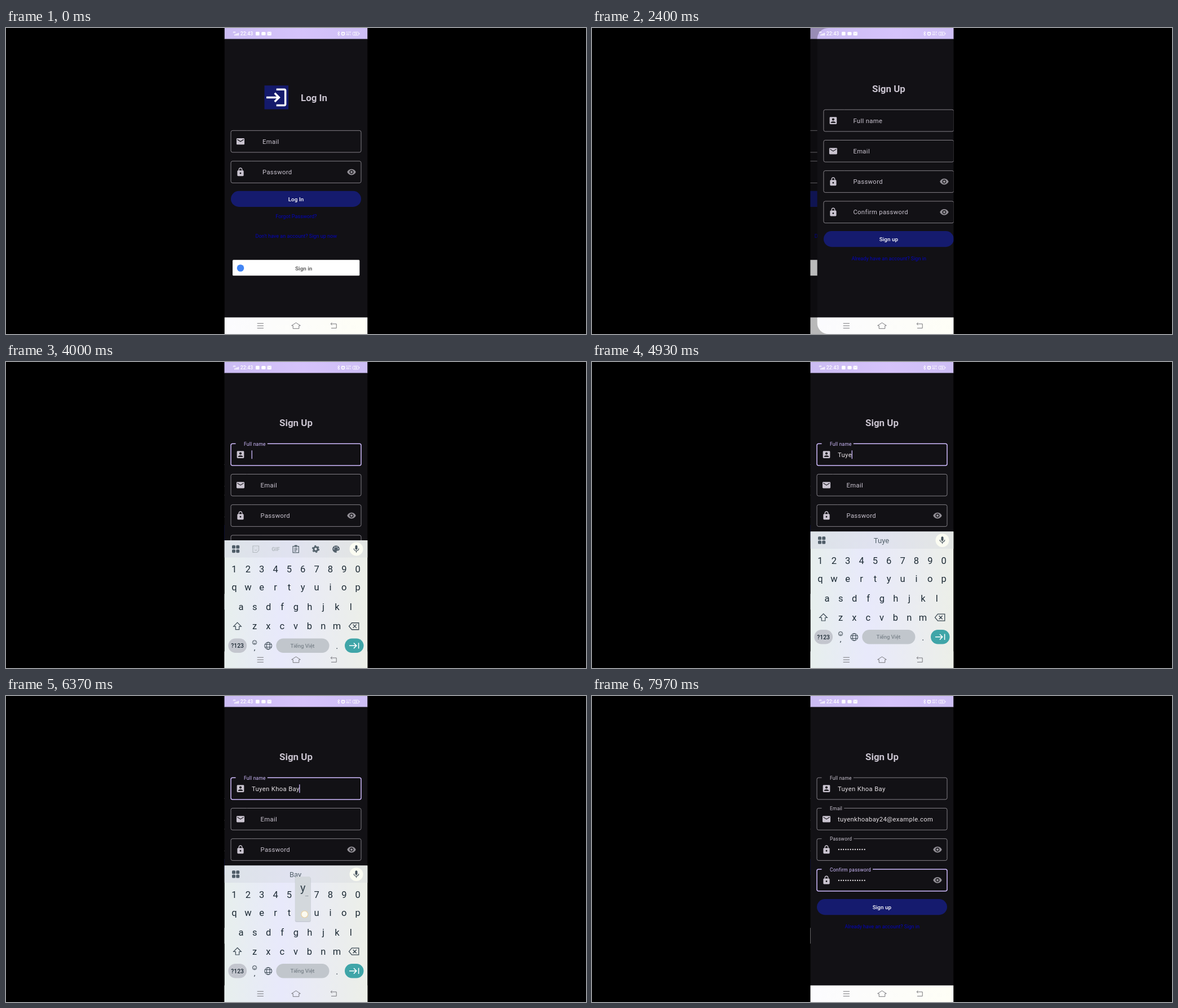
Animation of 1029x544 px, one loop 8000 ms. Source, as an HTML page:

```html
<!DOCTYPE html>
<html lang="en">
<head>
<meta charset="utf-8">
<title>Sign up flow</title>
<style>
html, body { margin: 0; width: 100%; height: 100%; overflow: hidden; background: #000; }
svg { display: block; }
text { font-family: Roboto, sans-serif; white-space: pre; }
</style>
</head>
<body>
<svg id="stage" width="1029" height="544" viewBox="0 0 1029 544">
  <defs>
    <clipPath id="phone"><rect x="387.5" width="254" height="544"/></clipPath>
    <clipPath id="sheet"><rect id="sheetBox" x="387.5" width="300" height="544"/></clipPath>
    <linearGradient id="bar"><stop stop-color="#cbbcf3"/><stop offset=".55" stop-color="#d6c3fb"/><stop offset="1" stop-color="#cdbef5"/></linearGradient>
    <linearGradient id="nav"><stop stop-color="#fbfbfe"/><stop offset="1" stop-color="#fefef6"/></linearGradient>
    <linearGradient id="board"><stop stop-color="#e7efed"/><stop offset=".4" stop-color="#e8e9fb"/><stop offset="1" stop-color="#ecefe8"/></linearGradient>
    <linearGradient id="strip"><stop stop-color="#dde3e8"/><stop offset=".45" stop-color="#e0e2f0"/><stop offset="1" stop-color="#e3e6e3"/></linearGradient>
  </defs>
  <rect width="1029" height="544" fill="#000"/>
  <g id="root" clip-path="url(#phone)"></g>
</svg>
<script>
const LOOP = 8000;
const SLIDE = 2190, FOCUS = 3740, KEYS_UP = 3800, NEXT = 6660, CUT = 7760;
const NAME = 'Tuyen Khoa Bay';
const NAME_AT = [4330, 4500, 4680, 4850, 5010, 5160, 5300, 5410, 5510, 5620, 5755, 5960, 6150, 6340];
const MAIL = 'tuyenkhoabay24@example.com';
const MAIL_AT = [6950, 7110, 7225, 7420, 7570, 7690];
const ROWS = [['1234567890', 405, 353], ['qwertyuiop', 405, 385], ['asdfghjkl', 417, 420], ['zxcvbnm', 441, 454]];
const SHIFTED = '!@#$%^&*()', STEP = 24.35;
const PALE = '#cac4d0', LILAC = '#d0bcff', INK = '#1c2a34', GREY = '#53616b';
const ICON = {
  mail: 'M20 4H4c-1.1 0-2 .9-2 2v12c0 1.1.9 2 2 2h16c1.1 0 2-.9 2-2V6c0-1.1-.9-2-2-2zm0 4l-8 5-8-5V6l8 5 8-5v2z',
  lock: 'M18 8h-1V6c0-2.76-2.24-5-5-5S7 3.24 7 6v2H6c-1.1 0-2 .9-2 2v10c0 1.1.9 2 2 2h12c1.1 0 2-.9 2-2V10c0-1.1-.9-2-2-2zm-6 9c-1.1 0-2-.9-2-2s.9-2 2-2 2 .9 2 2-.9 2-2 2zm3.1-9H8.9V6c0-1.71 1.39-3.1 3.1-3.1s3.1 1.39 3.1 3.1v2z',
  eye: 'M12 4.5C7 4.5 2.73 7.61 1 12c1.73 4.39 6 7.5 11 7.5s9.27-3.11 11-7.5c-1.73-4.39-6-7.5-11-7.5zM12 17c-2.76 0-5-2.24-5-5s2.24-5 5-5 5 2.24 5 5-2.24 5-5 5zm0-8c-1.66 0-3 1.34-3 3s1.34 3 3 3 3-1.34 3-3-1.34-3-3-3z',
  user: 'M3 5v14c0 1.1.9 2 2 2h14c1.1 0 2-.9 2-2V5c0-1.1-.9-2-2-2H5c-1.1 0-2 .9-2 2zm12 4c0 1.66-1.34 3-3 3s-3-1.34-3-3 1.34-3 3-3 3 1.34 3 3zm-9 8c0-2 4-3.1 6-3.1s6 1.1 6 3.1v1H6v-1z',
  enter: 'M11 7L9.6 8.4l2.6 2.6H2v2h10.2l-2.6 2.6L11 17l5-5-5-5zm9 12h-8v2h8c1.1 0 2-.9 2-2V5c0-1.1-.9-2-2-2h-8v2h8v14z'
};

const $ = id => document.getElementById(id);
const set = (e, attrs) => { for (const k in attrs) e.setAttribute(k, attrs[k]); return e; };
function add(parent, tag, attrs, str) {
  const e = set(document.createElementNS('http://www.w3.org/2000/svg', tag), attrs);
  if (str !== undefined) e.textContent = str;
  parent.appendChild(e);
  return e;
}
const group = (parent, attrs = {}) => add(parent, 'g', attrs);
const rect = (p, x, y, width, height, fill, rx = 0) => add(p, 'rect', { x, y, width, height, fill, rx });
const dot = (p, cx, cy, r, fill) => add(p, 'circle', { cx, cy, r, fill });
const line = (p, d, stroke, w = 1) => add(p, 'path', { d, stroke, fill: 'none', 'stroke-width': w });
const label = (p, x, y, size, fill, str, weight = 400, anchor = 'middle') =>
  add(p, 'text', { x, y, 'font-size': size, fill, 'font-weight': weight, 'text-anchor': anchor }, str);
const icon = (p, name, cx, cy, fill, s = 0.704) =>
  add(p, 'path', { d: ICON[name], fill, transform: `translate(${cx - 12 * s} ${cy - 12 * s}) scale(${s})` });
const show = (e, on) => e.setAttribute('visibility', on ? 'inherit' : 'hidden');
const clamp = v => Math.min(1, Math.max(0, v));
const easeOut = v => 1 - (1 - clamp(v)) ** 3;
const count = (list, t) => list.filter(v => v <= t).length;

const root = $('root');

function screen(attrs) {
  const g = group(root, attrs);
  rect(g, 387.5, 0, 254, 20, 'url(#bar)');
  rect(g, 387.5, 19.5, 254, 495.5, '#121115');
  rect(g, 387.5, 514.5, 254, 30, 'url(#nav)');
  return g;
}
function button(g, y, str) {
  rect(g, 399, y, 231, 28.2, '#151b6e', 14.1);
  label(g, 514.5, y + 17.8, 9.86, '#fff', str, 500).setAttribute('letter-spacing', 0.07);
}
const link = (g, y, str) => label(g, 514.8, y, 9.1, '#0404bd', str);

function field(g, y, name, pic, labelX, eye) {
  const edge = line(g, '', '#918e95', 0.9);
  icon(g, pic, 416, y + 19.4, PALE);
  if (eye) icon(g, 'eye', 613, y + 19.4, '#918e95');
  const cap = label(g, 422, 0, 8.45, PALE, name, 400, 'start');
  cap.setAttribute('letter-spacing', '.03em');
  const gapEnd = 425 + cap.getComputedTextLength();
  const value = label(g, 436, y + 23.6, 11.27, '#e6e1e5', '', 400, 'start');
  value.setAttribute('letter-spacing', 0.35);
  const caret = rect(g, 436, y + 12, 1.3, 15, LILAC);
  return (float, focus, str, blink) => {
    const mid = (407.5 + gapEnd) / 2, half = (gapEnd - 407.5) / 2 * float;
    set(edge, {
      d: `M${mid + half} ${y}H627a3 3 0 0 1 3 3v32.7a3 3 0 0 1-3 3H402a3 3 0 0 1-3-3v-32.7a3 3 0 0 1 3-3H${mid - half}`,
      stroke: focus ? LILAC : '#918e95', 'stroke-width': focus ? 1.5 : 0.9
    });
    set(cap, {
      x: labelX + (422 - labelX) * float, y: y + 23.4 - 19.8 * float,
      'font-size': 11.27 - 2.82 * float, fill: focus ? LILAC : PALE
    });
    value.textContent = str;
    show(caret, blink);
    if (blink) caret.setAttribute('x', 435.6 + (str ? value.getComputedTextLength() : 0));
  };
}

// Log in screen
const login = screen();
rect(login, 458.5, 102.2, 42.5, 42.3, '#141a6b');
icon(login, 'enter', 479.7, 123.4, '#fff', 1.77);
label(login, 523, 130, 16.9, PALE, 'Log In', 700, 'start');
field(login, 182.3, 'Email', 'mail', 455)(0, false, '', false);
field(login, 236.7, 'Password', 'lock', 455, true)(0, false, '', false);
button(login, 289.8, 'Log In');
link(login, 338, 'Forgot Password?');
link(login, 373, "Don't have an account? Sign up now");
rect(login, 402, 412.3, 225.3, 28, '#fff', 1.5);
dot(login, 416, 426.7, 6.3, '#4285f4');
label(login, 528.2, 430.8, 9.86, '#666', 'Sign in', 700);
const dim = rect(login, 387, 0, 255, 544, '#000');

// Sign up screen
const signup = screen({ 'clip-path': 'url(#sheet)' });
label(signup, 514.5, 113.6, 16.9, PALE, 'Sign Up', 700);
const fields = [['Full name', 'user'], ['Email', 'mail'], ['Password', 'lock', 1], ['Confirm password', 'lock', 1]]
  .map(([name, pic, eye], i) => field(signup, 145.2 + 54.25 * i, name, pic, 451.5, eye));
button(signup, 361, 'Sign up');
link(signup, 413.2, 'Already have an account? Sign in');

// Keyboard
const board = group(root);
rect(board, 387.5, 301.5, 254, 300, 'url(#board)');
rect(board, 387.5, 301.5, 254, 30.5, 'url(#strip)');
for (const x of [401, 408.2]) for (const y of [310.3, 317.6]) rect(board, x, y, 6, 6, '#4f5d68', 1.6);

const tools = group(board), soft = '#b3babf';
line(tools, 'M438 311.5h10.5v8l-3.5 3.5h-7zM441 318q2 2.5 4.5 0M441 314.6v1M445.5 314.6v1', soft, 1.1);
label(tools, 478.5, 320.8, 9.5, soft, 'GIF', 700);
line(tools, 'M509 312h10.4v11.4h-10.4zM511.5 315.5h5.5M511.5 318h5.5M511.5 320.5h3.5', GREY, 1.2);
rect(tools, 511.7, 310, 5, 3, GREY, 1);
add(tools, 'circle', { cx: 549.5, cy: 317, r: 3.7, fill: 'none', stroke: GREY, 'stroke-width': 3 });
add(tools, 'circle', { cx: 549.5, cy: 317, r: 5.8, fill: 'none', stroke: GREY, 'stroke-width': 1.8, 'stroke-dasharray': '3 3.07' });
add(tools, 'path', { d: 'M585.5 310.6a6.4 6.4 0 1 0 0 12.8c2.2 0 .6-2 1.2-3 .8-1.2 5.2.6 5.2-3.8a6.4 6 0 0 0-6.4-6z', fill: GREY });
[[581.8, 316.8], [583.6, 313.6], [587.2, 313.5], [589.3, 316.4]].forEach(([x, y]) => dot(tools, x, y, 1, '#e0e2ee'));

const hintA = label(board, 450.5, 321.7, 13, GREY, '');
const hintB = label(board, 513.5, 321.7, 13, GREY, '');
const split = line(board, 'M480.5 309v16', '#c4c9d0', 0.8);
const micDisc = dot(board, 621.5, 317, 12, '#fbfcf2');
const mic = group(board);
rect(mic, 619.5, 310.2, 4, 8, '#46535d', 2);
line(mic, 'M617.2 316a4.3 4.3 0 0 0 8.6 0M621.5 320.3v3', '#46535d', 1.2);

const keys = ROWS.map(([chars, x0, y]) => [...chars].map((ch, i) => label(board, x0 + STEP * i, y + 5.8, 16.5, INK, ch)));
const shift = add(board, 'path', { d: 'M410.5 447.5l6.8 7h-3.6v5.5h-6.4v-5.5h-3.6z', stroke: '#3a4852', 'stroke-width': 1.2 });
line(board, 'M613.5 448.2h12.3v12h-12.3l-5-6zM615.6 451l6.2 6.3M621.8 451l-6.2 6.3', '#3a4852', 1.3);
rect(board, 394.3, 476, 32.8, 25.5, '#c3c6ce', 12.7);
label(board, 410.6, 492.5, 10.3, INK, '?123', 500);
const comma = group(board);
line(comma, 'M437.3 483a3.7 3.7 0 1 0 7.4 0a3.7 3.7 0 1 0-7.4 0M439 484q2 2.4 4 0M439.6 481.2v1M442.4 481.2v1', INK, 0.8);
label(comma, 441, 496.5, 13, INK, ',');
const at = label(board, 441, 493.5, 13.5, INK, '@');
line(board, 'M458.8 489a6.4 6.4 0 1 0 12.8 0a6.4 6.4 0 1 0-12.8 0M462.3 489a2.9 6.4 0 1 0 5.8 0a2.9 6.4 0 1 0-5.8 0M459.3 486.6h11.8M459.3 491.4h11.8', '#33424c', 1);
const space = rect(board, 479.3, 476, 94.2, 25.5, '#c1c6cc', 12.7);
label(board, 526, 492.3, 9.6, '#6a747c', 'Tiếng Việt');
label(board, 587.3, 494.5, 15, INK, '.');
rect(board, 601, 476, 33.5, 25.5, '#3fa5a8', 12.7);
line(board, 'M609 488.8h12.5M617 484l4.8 4.8-4.8 4.8M625.6 483.6v10.4', '#fff', 1.5);

const pop = group(board);
rect(pop, -14, -63, 28, 80, '#8f989e', 3).setAttribute('opacity', 0.35);
rect(pop, -13.5, -64, 27, 79, '#d3d8dc', 3);
const popChar = label(pop, 0, -37, 20, '#33424c', '');
label(pop, 7, -29, 9, '#33424c', '…');

// System bars
const sys = group(root);
label(sys, 405, 8.7, 4, '#fff', '4G', 700);
for (let i = 0; i < 4; i++) rect(sys, 405 + 2.2 * i, 11.4 - 0.9 * i, 1.5, 2 + 0.9 * i, '#fff');
const clock = label(sys, 427, 13.3, 8.8, '#fff', '', 500);
rect(sys, 443, 6.7, 6.6, 6.6, '#fff', 1.2);
rect(sys, 453.3, 6.9, 7.2, 6.2, '#fff', 1.6);
rect(sys, 463.6, 6.7, 7.2, 6.6, '#fff', 1);
line(sys, 'M464.5 8.2l2.7 2 2.7-2', '#cdbef5', 0.7);
line(sys, 'M588 8l4 4-2 2V6l2 2-4 4', '#fff', 0.8);
add(sys, 'circle', { cx: 598, cy: 10.3, r: 2.5, fill: 'none', stroke: '#fff', 'stroke-width': 1.4 });
line(sys, 'M594.9 8.4l1.6-1.6M601.1 8.4l-1.6-1.6', '#fff', 1);
const speed = label(sys, 607.7, 9, 4.3, '#fff', '', 500);
label(sys, 607.7, 13, 3.9, '#fff', 'KB/s', 500);
add(sys, 'rect', { x: 615.2, y: 7.2, width: 10.6, height: 5.8, rx: 1.6, fill: 'none', stroke: '#fff', 'stroke-width': 0.8 });
rect(sys, 626.3, 9, 1, 2.2, '#fff');
label(sys, 620.4, 12, 5, '#fff', '26', 500);
line(sys, 'M445.7 525.2h11.2M445.7 529.4h11.2M445.7 533.6h11.2', '#77777c', 1);
line(sys, 'M514.5 524l7.8 5h-2.5v5.3h-10.6v-5.3h-2.5z', '#77777c', 1);
line(sys, 'M578.5 523.8l-2.4 2.2 2.4 2.2M576.2 526h10v7.6h-9.2', '#77777c', 1);

const touch = dot(root, 0, 0, 6, '#fffdf2');
set(touch, { stroke: '#ecd2a0', 'stroke-width': 1.2, opacity: 0.92 });

function keyAt(ch) {
  if (ch === ' ') return [542, 486];
  const [chars, x, y] = ROWS.find(r => r[0].includes(ch));
  return [x + STEP * chars.indexOf(ch), y];
}
const presses = [[NAME, NAME_AT], [MAIL, MAIL_AT]].flatMap(([str, times]) =>
  times.map((time, i) => ({ from: time - 70, to: time + 40, ch: str[i], pos: keyAt(str[i].toLowerCase()) })));
const taps = [[2130, 2200, 560, 370], [3670, 3740, 500, 166], [6590, 6660, 620, 489]]
  .map(([from, to, x, y]) => ({ from, to, pos: [x - 3, y - 3] }));

function draw(t) {
  const done = t >= CUT;

  // page slide
  const p = easeOut((t - SLIDE) / 330), x = 254 * (1 - p);
  show(signup, p > 0);
  set(signup, { transform: `translate(${x} 0)` });
  $('sheetBox').setAttribute('rx', p < 1 ? 20 : 0);
  set(login, { transform: `translate(${-50 * p} 0)` });
  dim.setAttribute('opacity', 0.28 * p);

  // form
  const inMail = t >= NEXT;
  const typed = inMail ? MAIL : NAME, times = inMail ? MAIL_AT : NAME_AT;
  const n = count(times, t), start = n ? times[n - 1] : inMail ? NEXT : FOCUS;
  const blink = !done && t >= FOCUS && (t - start) % 1000 < 500;
  const rise = from => easeOut((t - from) / 160);
  const secret = done ? '•'.repeat(12) : '';
  fields[0](rise(FOCUS), t >= FOCUS && !inMail, NAME.slice(0, count(NAME_AT, t)), blink && !inMail);
  fields[1](rise(NEXT), inMail && !done, done ? MAIL : MAIL.slice(0, count(MAIL_AT, t)), blink && inMail);
  fields[2](+done, false, secret, false);
  fields[3](+done, done, secret, false);

  // keyboard
  show(board, t >= KEYS_UP && !done);
  set(board, { transform: `translate(0 ${243 * (1 - easeOut((t - KEYS_UP) / 335))})` });
  const ahead = count(times, t + 40);
  const caps = !inMail && t > 4080 && (!ahead || typed[ahead - 1] === ' ');
  keys.forEach((row, r) => row.forEach((key, i) => {
    const ch = ROWS[r][0][i];
    key.textContent = !caps ? ch : r ? ch.toUpperCase() : SHIFTED[i];
  }));
  shift.setAttribute('fill', caps ? '#0d1a22' : 'none');
  const word = typed.slice(0, ahead).trim().split(' ').pop();
  const pair = word === 'Khoa';
  show(tools, !word && !inMail);
  hintA.textContent = pair ? word : '';
  hintB.textContent = pair ? 'Khóa' : word;
  show(split, pair);
  show(micDisc, !inMail);
  mic.setAttribute('opacity', inMail ? 0.45 : 1);
  show(comma, !inMail);
  show(at, inMail);

  const held = done ? null : presses.find(k => t >= k.from && t < k.to);
  const letter = held && held.ch !== ' ';
  space.setAttribute('fill', held && !letter ? '#b0bbc1' : '#c1c6cc');
  show(pop, letter);
  if (letter) {
    set(pop, { transform: `translate(${held.pos})` });
    popChar.textContent = held.ch;
  }
  const tap = held || taps.find(k => t >= k.from && t < k.to);
  show(touch, tap);
  if (tap) set(touch, { cx: tap.pos[0] + 3, cy: tap.pos[1] + 3 });

  clock.textContent = t < 6600 ? '22:43' : '22:44';
  speed.textContent = ['0,20', '10,3', '10,8', '0,40', '0,20', '1,20', '3,10', '60,0'][Math.floor(t / 1000)];
}

const t0 = performance.now();
function tick() {
  draw((performance.now() - t0) % LOOP);
  requestAnimationFrame(tick);
}
tick();
</script>
</body>
</html>
```
